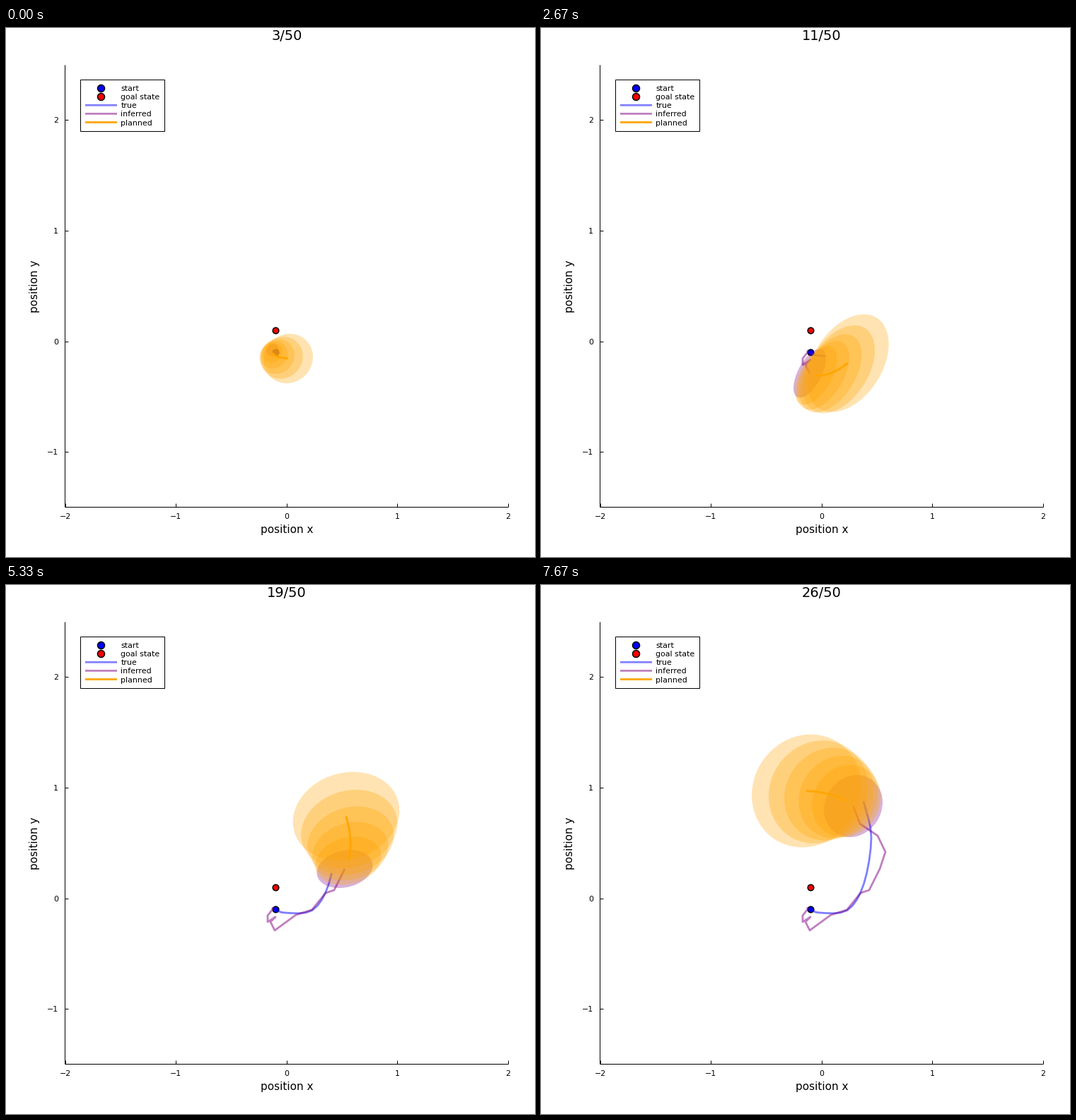
A matplotlib script for the animation above (8 s loop, 748x749 px).

```python
import numpy as np
import matplotlib.pyplot as plt
from matplotlib.animation import FuncAnimation
from matplotlib.patches import Polygon, Rectangle

W, H, DPI = 748, 749, 64
PT = 72 / DPI                      # points per pixel
LOOP, TICK = 8000, 40              # ms
FIRST, LAST, TOTAL, HORIZON = 3, 26, 50, 5
X0, Y0, UNIT = 396.9, 443.5, 156.6

plt.rcParams["font.family"] = "DejaVu Sans"
fig = plt.figure(figsize=(W / DPI, H / DPI), dpi=DPI, facecolor="white")
ax = fig.add_axes([0, 0, 1, 1])
ax.set_xlim(0, W)
ax.set_ylim(H, 0)
ax.axis("off")

# The true path is a smooth curve through one point every four steps from 6 on.
TRUE_KNOTS = np.array([(381, 459), (394, 464), (433, 460.5), (456.5, 423),
                       (467, 357), (456, 306)])
# Corners of the inferred path: step, x, y.
CORNERS = np.array([
    (3, 377, 456), (6, 377, 459), (7, 370, 468), (8, 370, 477),
    (9, 381, 470), (10, 374, 477), (11, 380, 489), (12, 410, 467),
    (14, 432.5, 460), (16, 452, 436), (17, 464, 432), (19, 479, 402),
    (21, 487, 378), (22, 476, 355), (24, 451, 338), (26, 441.5, 313)])
# Step, belief half width, half height and correlation, reach of the plan.
STATES = np.array([
    (3, 9, 9, .1, 22, 12), (7, 21, 20.5, .6, 28.5, 5),
    (11, 23, 34.5, .6, 54, -14.5), (14, 24.5, 20, -.27, 34, -52.5),
    (19, 39.5, 27, .2, 2, -74.5), (22, 42, 36, .25, -27, -54),
    (26, 41.5, 44, .12, -66, -21.5)])
ANGLE = np.linspace(0, 2 * np.pi, 120)


def at(step, table):
    return np.array([np.interp(step, table[:, 0], c) for c in table[:, 1:].T])


def true_at(step):
    u = max(0, (step - 6) / 4)
    i = min(int(u), len(TRUE_KNOTS) - 2)
    s = u - i
    slope = np.gradient(TRUE_KNOTS, axis=0)
    ease = s * s * (3 - 2 * s)
    return (TRUE_KNOTS[i] * (1 - ease) + TRUE_KNOTS[i + 1] * ease
            + s * (1 - s) * (slope[i] * (1 - s) - slope[i + 1] * s))


def ellipse(center, half_w, half_h, corr):
    x = center[0] + half_w * np.cos(ANGLE)
    y = center[1] - half_h * np.sin(ANGLE + np.arcsin(corr))
    return np.column_stack([x, y])


def plan_curve(step, start, reach):
    """Leave at an angle to the reach, then bend towards its end."""
    turn = np.radians(20 + 60 * np.exp((FIRST - step) / 8))
    c, s = np.cos(turn), np.sin(turn)
    heading = .85 * np.array([[c, -s], [s, c]]) @ reach
    t = np.arange(1, HORIZON + 1)[:, None] / HORIZON
    return start + heading * t + (reach - heading) * t * t


def stroke(xs, ys, color="black", width=1.0, **kw):
    return ax.plot(xs, ys, color=color, lw=width * PT, solid_capstyle="butt",
                   solid_joinstyle="round", **kw)[0]


def label(x, y, text, size, **kw):
    return ax.text(x, y, text, fontsize=size * PT, va="baseline", **kw)


def dot(x, y, color, diameter):
    ax.plot([x], [y], "o", ms=diameter * PT, mfc=color, mec="black",
            mew=1.5 * PT)


def blob(color, zorder):
    return ax.add_patch(Polygon([(0, 0), (1, 0), (0, 1)], fc=color, lw=0,
                                alpha=.3, zorder=zorder))


def draw_axes():
    left, right = X0 - 2 * UNIT - .3, X0 + 2 * UNIT
    top, bottom = Y0 - 2.5 * UNIT, Y0 + 1.5 * UNIT
    stroke([left, left], [top, bottom])
    stroke([left, right], [bottom, bottom])
    for v in range(-2, 3):
        text = str(v).replace("-", "\u2212")
        x, y = X0 + v * UNIT, Y0 - v * UNIT
        stroke([x, x], [bottom, bottom - 5])
        label(x, 695, text, 11, ha="center")
        if v > -2:
            stroke([left, left + 5], [y, y])
            label(74, y + 4, text, 11, ha="right")
    label(X0, 715, "position x", 15.2, ha="center")
    label(45, 365.5, "position y", 15.2, ha="center", rotation=90,
          rotation_mode="anchor")


def draw_legend():
    ax.add_patch(Rectangle((105.2, 73), 119, 73, fc="white", ec="black",
                           lw=PT))
    rows = [("start", "blue"), ("goal state", "red"), ("true", "#8080ff"),
            ("inferred", "#c080c0"), ("planned", "orange")]
    for i, (text, color) in enumerate(rows):
        y = 85 + 12.13 * i
        if i < 2:
            dot(134.5, y, color, 10)
        else:
            stroke([112, 157], [y, y], color, 2.8, snap=False)
        label(162.5, y + 4, text, 11)


draw_axes()
draw_legend()
dot(381, 459.2, "blue", 8.6)
dot(381, 427.8, "red", 8.6)
title = label(X0, 17, "", 19.4, ha="center")
true_line = stroke([], [], "blue", 2.8, alpha=.5, zorder=3)
inferred_line = stroke([], [], "purple", 2.8, alpha=.5, zorder=3.1)
belief_blob = blob("purple", 3.2)
plan_blobs = [blob("orange", 4) for _ in range(HORIZON)]
plan_line = stroke([], [], "orange", 2.8, zorder=5)


def update(frame):
    # Three steps a second, each rounded to the tick that contains its start.
    step = FIRST + int((frame * TICK + 30) * 3 / 1000)
    step = min(step, LAST)
    title.set_text(f"{step}/{TOTAL}")

    past = range(FIRST, step + 1)
    inferred = np.array([at(n, CORNERS) for n in past])
    true_line.set_data(*np.array([true_at(n) for n in past]).T)
    inferred_line.set_data(*inferred.T)

    half_w, half_h, corr, *reach = at(step, STATES)
    belief_blob.set_xy(ellipse(inferred[-1], half_w, half_h, corr))

    # Planned states grow evenly wider and lose some of their tilt.
    plan = plan_curve(step, inferred[-1], np.array(reach))
    growth = 36 - 10 * np.exp((FIRST - step) / 4)
    for j, patch in enumerate(plan_blobs, 1):
        s = j / HORIZON
        patch.set_xy(ellipse(plan[j - 1], half_w + growth * s,
                             half_h + growth * s, corr * (1 - .35 * s)))
    plan_line.set_data(*plan.T)
    return [title, true_line, inferred_line, belief_blob, *plan_blobs,
            plan_line]


anim = FuncAnimation(fig, update, frames=LOOP // TICK, interval=TICK,
                     repeat=True, repeat_delay=0, blit=False)
plt.show()
```
